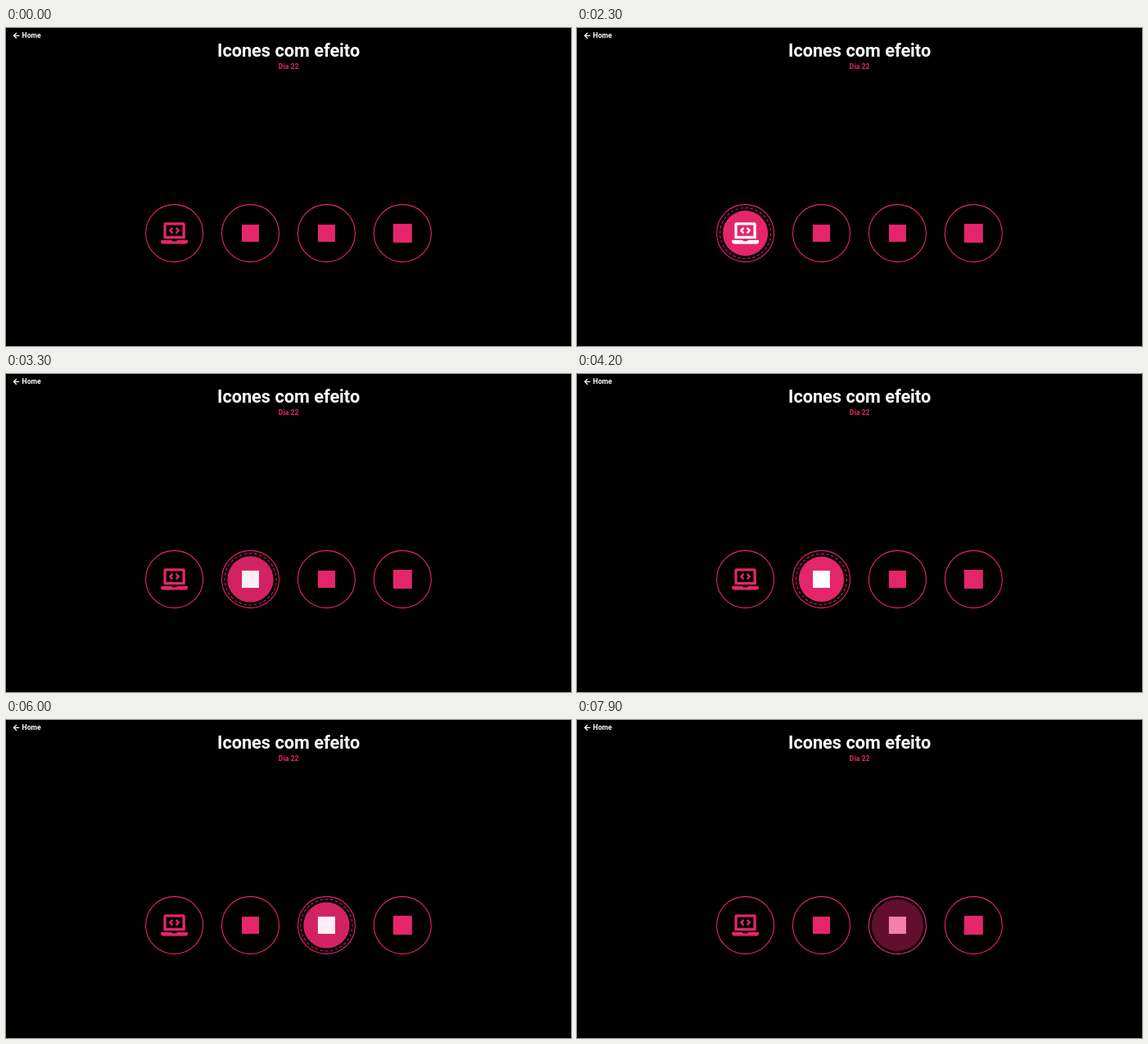
Animation, 690 px wide and 388 px high, one loop 8000 ms. Source, as an HTML page:

```html
<!DOCTYPE html>
<html lang="pt">
<head>
<meta charset="utf-8">
<title>Icones com efeito</title>
<style>
  html, body { margin: 0; width: 100%; height: 100%; overflow: hidden; background: #000; }
  svg { display: block; width: 100%; height: 100%; }
  text { font-family: Roboto, sans-serif; font-weight: 700; fill: #fff; }
  .pink { fill: #e4256c; }
  .ring { fill: none; stroke: #e4256c; }
</style>
</head>
<body>
<svg viewBox="0 0 690 388">
  <rect width="690" height="388"/>
  <path d="M16.3 9.3H9.8M12.9 5.9L9.5 9.3l3.4 3.4" fill="none" stroke="#fff" stroke-width="1.3"/>
  <text x="19.6" y="12.3" font-size="8.6">Home</text>
  <text x="345.1" y="35" font-size="21.7" text-anchor="middle">Icones com efeito</text>
  <text class="pink" x="345.1" y="50" font-size="8.6" text-anchor="middle">Dia 22</text>
  <g id="icons"></g>
</svg>
<script>
const LOOP = 8000, STEP = 100, FADE = 300, SPIN = 9000;
const PINK = [228, 37, 108], WHITE = [255, 255, 255];

const laptop = `<g transform="scale(.0515) translate(-320 -256)">
  <path d="M64 384V48Q64 0 112 0H528Q576 0 576 48V384ZM128 64V320H512V64Z" fill-rule="evenodd"/>
  <path d="M266 145L219 192l47 47M374 145l47 47l-47 47" fill="none" stroke="currentColor"
    stroke-width="48" stroke-linecap="round" stroke-linejoin="round"/>
  <path d="M16 416H255Q258 448 288 448H349Q380 446 382 416H624Q640 416 640 432V448Q640 512 576 512H64Q0 512 0 448V432Q0 416 16 416Z"/>
</g>`;
const square = size => `<rect x="${-size / 2}" y="${-size / 2}" width="${size}" height="${size}"/>`;

// enter and leave are the hover times of each icon
const icons = [
  { x: 205.6, art: laptop, enter: 900, leave: 2800 },
  { x: 298.5, art: square(21), enter: 3100, leave: 5500 },
  { x: 391.4, art: square(21), enter: 5800, leave: 7800 },
  { x: 484.3, art: square(23), enter: Infinity, leave: Infinity }
];

const root = document.getElementById('icons');
root.innerHTML = icons.map(({ x, art }) => `<g transform="translate(${x} 250.4)">
  <circle class="ring" r="35" stroke-width="1.1"/>
  <g class="glow">
    <circle class="pink" r="27.6"/>
    <circle class="ring dash" r="31" pathLength="160" stroke-dasharray="3 2"/>
  </g>
  <g class="art" fill="currentColor">${art}</g>
</g>`).join('');
icons.forEach((icon, i) => {
  const find = name => root.children[i].querySelector(name);
  Object.assign(icon, { glow: find('.glow'), dash: find('.dash'), artNode: find('.art') });
});

// cubic-bezier(.25, .1, .25, 1)
function ease(x) {
  if (x <= 0) return 0;
  if (x >= 1) return 1;
  const curve = (a, b, u) => 3 * a * u * (1 - u) ** 2 + 3 * b * u * u * (1 - u) + u ** 3;
  let lo = 0, hi = 1;
  for (let i = 0; i < 20; i++) {
    const mid = (lo + hi) / 2;
    if (curve(.25, .25, mid) < x) lo = mid; else hi = mid;
  }
  return curve(.1, 1, lo);
}

function draw(t) {
  for (const { enter, leave, glow, dash, artNode } of icons) {
    const p = t < enter ? 0 : ease((t - enter) / FADE) - ease((t - leave) / FADE);
    const angle = t < enter ? 0 : (t - enter) / SPIN * 360;
    glow.setAttribute('opacity', p);
    glow.setAttribute('transform', `scale(${1.25 - .25 * p})`);
    dash.setAttribute('transform', `rotate(${angle})`);
    const mix = PINK.map((c, i) => Math.round(c + (WHITE[i] - c) * p));
    artNode.setAttribute('color', `rgb(${mix})`);
  }
}

const start = performance.now();
function tick() {
  const t = (performance.now() - start) % LOOP;
  draw(Math.floor(t / STEP) * STEP);
  requestAnimationFrame(tick);
}
tick();
</script>
</body>
</html>
```
